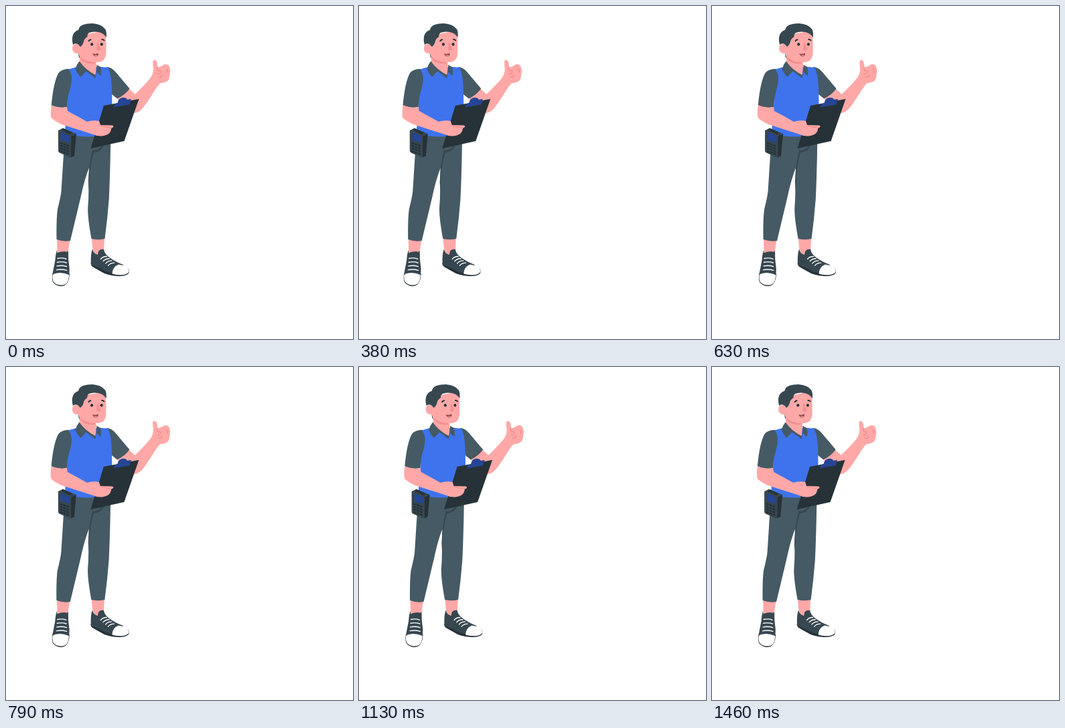
Animation, 518 px wide and 498 px high, one loop 1.5 s. Source, as an HTML page:

```html
<!DOCTYPE html>
<html lang="en">
<head>
<meta charset="utf-8">
<title>Thumbs up</title>
<style>
  html, body { margin: 0; width: 100%; height: 100%; overflow: hidden; background: #fff; }
  svg { display: block; width: 100vw; height: 100vh; }
  .skin { fill: #ffa8a7; }
  .shade { fill: #f28f8f; }
  .blue { fill: #3e73ed; }
  .navy { fill: #264594; }
  .grey { fill: #455a64; }
  .slate { fill: #37474f; }
  .dark { fill: #263238; }
  .white { fill: #fff; }
  .line { fill: none; stroke-linecap: round; stroke-linejoin: round; }
</style>
</head>
<body>
<svg viewBox="0 0 518 498">
  <g id="man">
    <!-- legs -->
    <path class="skin" d="M76 346L96 347Q94 358 92.500 368Q85 372 76.500 368Z"/>
    <path class="skin" d="M127.500 345H147.500Q146 357 146.500 366Q142 372 135 372Q129 367 129 360Z"/>
    <path class="grey" d="M86.500 190Q106 196 131 193L156.200 203Q155.500 250 153.700 289Q151.500 318 147.500 348Q138 350.500 127.500 348Q121.500 315 122.300 301Q124 281 123 264Q124 250 124 242Q117 260 111.500 286L96 351Q86 353 75.500 349Q75 318 77 304Q82 284 82.500 277L86 222Z"/>
    <path class="slate" d="M130 212Q126 228 124 243L123 262Q124 280 123 286L125 248Q127.500 231 131 219Q143 218 146 208L142.500 210Q138 215.500 130 216Z"/>

    <!-- left shoe -->
    <path class="dark" d="M69.500 400Q68 408 70 413Q75 419 83 419Q91 419 94 408L95 400Z"/>
    <path class="slate" d="M76 365Q74 371 73.500 380L69.200 402Q69 409 72 412L92 411Q95 402 94.700 392Q92.500 378 93 366Q91 369 88 367Q82 367 76.500 369Z"/>
    <path class="white" d="M69.500 403Q70 400 76 399.500Q84 398 94 402Q94 409 91 414Q88 417.500 82 417.500Q74 417 70.500 412Q69 408 69.500 403Z"/>
    <g id="lacesL" class="line" stroke="#fff" stroke-width="1.4"></g>

    <!-- right shoe -->
    <path class="dark" d="M126.500 384Q126.500 389 131 391Q138 395 147 400Q158 404 169 404Q179 404 183 400Q185 396 182 392Z"/>
    <path class="slate" d="M129 363.500Q126 371 127 387Q139 391 149 397Q157 400 166 400L175 387Q162 382 153 375Q147 370 146 364Q141 363 138 367L137 372Q131 371 129 363.500Z"/>
    <path class="white" d="M158.500 400.500Q159 390 168 386.500Q172 387 179 389.500Q184 393 183.500 397.500Q181 402 171 402.300Q164 402.500 158.500 400.500Z"/>
    <g id="lacesR" class="line" stroke="#fff" stroke-width="1.4"></g>

    <!-- raised arm -->
    <path class="skin" d="M166 138L183 123L192.500 132Q210 115 216 107Q220 101 220 94Q219 86 219.500 82Q222 78.500 225 83Q227 88 226 92Q233 90 236 87.500Q240 86 243 89Q246 95 245 100Q244 109 242 111.500Q238 115 230 115.500Q225 121 219 131Q209 147 203 154Q197 160 191 160L176 152Z"/>
    <path class="line" stroke="#e8807f" d="M226 91Q225 95 227 97M228 97Q232 95 231 99Q229 102 226 102M231 103Q235 103 233 106Q231 108 228 106M240 94Q242 96 241 99"/>

    <!-- torso -->
    <path class="grey" d="M150 91Q158 92 163 98Q174 111 184.500 123.500Q178 133 166 138.500L158 132Z"/>
    <path class="blue" d="M92 95L106 91L142 91L152 92Q156 99 157.300 112Q158.700 129 158.300 155L135 195Q105 197 88 190Q89 170 91 151Z"/>
    <path class="slate" d="M107.500 69L112 80L109 77Z"/>
    <path class="skin" d="M109.500 66L110 84Q119 98 133.500 105L135 88L134 80Z"/>
    <path class="shade" d="M111 76Q119 84 133 84L133 86Q120 88 112 80Z"/>
    <path class="grey" d="M109.500 82.500Q105 88 103.500 94.500Q107 102 111.500 106L119.500 97.500Q127 103 133.500 108L135 98.500L141.500 104.500Q143.500 97 141 91L135.500 88Q136 96 133.500 103Q119 96 109.500 82.500Z"/>
    <path class="grey" d="M93.500 94Q83 94.500 78.500 100Q71 113 67.700 148.500Q79 154 91 151Q91 139 95.500 124Q99 112 97.700 104Q96 98 93.500 94Z"/>

    <!-- head -->
    <path class="skin" d="M108 44L148 37Q150 45 149.500 72Q148 83 138 84Q126 84 116 78Q110 74 108.500 71Q100 72 99 64Q99 55 108 57Z"/>
    <path class="slate" d="M100 58Q97.500 48 100.500 42Q103.500 37 108 36Q109 30.500 115 28Q121 26 129 26Q143 27 148.500 35Q150.500 39 149.800 47Q145 40 138 39Q130 37.500 124 40Q121 42 121.500 46Q118 48 116.500 51Q115.500 58 111 61Q109.500 59 108 57.500Q103 55 100 58Z"/>
    <path class="shade" d="M136 55L135.500 66Q139 68 142 65Q139 61 137.500 55Z"/>
    <ellipse class="dark" cx="128.200" cy="57.300" rx="2" ry="2.200"/>
    <ellipse class="dark" cx="142.800" cy="57.200" rx="2" ry="2.200"/>
    <path class="line" stroke="#263238" stroke-width="2" d="M123.500 52.300Q124.500 50.500 126.500 50.300M143.300 50Q145.300 49.800 146.500 51.500"/>
    <path fill="#8f4a4c" d="M129 71Q133 72.500 138 70.500Q138 75 134.500 76Q131 75.500 129 71Z"/>
    <path class="shade" d="M131.500 74Q134 72.500 137 74L134.500 76Z"/>

    <!-- clipboard -->
    <path class="dark" d="M146 149L198.500 139L176.500 202L126.500 213Z"/>
    <path class="navy" d="M160.500 151.500L162.500 146.500L166.500 145Q167.500 138 174 137Q180 136.500 181 140L187 139L184.500 147.500Z"/>

    <!-- front arm -->
    <path class="skin" d="M67.700 148Q80 153.500 91 151L92 157Q107 165 121 173Q131 170 139 172L141 178Q150 178 159 178.500Q162 180 159 182Q157 182 157 184Q156 193 143 194.500Q136 195 130 192Q105 184 83 177Q71 171 67.500 167Q66 162 67.700 148Z"/>
    <path class="line" stroke="#e8807f" stroke-width=".8" d="M142 179Q150 182 157 182"/>

    <!-- card terminal -->
    <path class="slate" d="M78.500 186L85 182.500L105 191L97.500 195Z"/>
    <path class="dark" d="M97 195L105 191L102 224L97 226.500Z"/>
    <path class="slate" d="M78 187Q78 185 80 185.500L96 193Q98 194 97.500 197L97 225Q96.500 227 94.500 226L80 219.500Q78 218.500 78 216.500Z"/>
    <path class="dark" d="M83 185.500L86 183.500L99 189.500L96 192Z"/>
    <path class="navy" d="M82 189L95.500 194.500L95 204.500L82 200.500Z"/>
    <g id="keys" class="dark"></g>
  </g>
</svg>
<script>
const $ = id => document.getElementById(id);
const LOOP = 1500, LEAD = 28, UNIT = 1.036;
// sway position at every tenth of the loop
const SWAY = [0, -1, 2, -4, 4, -4, 4, -4, 2, -1, 0];

function sway(ms) {
  const u = ((ms + LEAD) % LOOP) / LOOP * 10;
  const i = Math.floor(u);
  return (SWAY[i] + (SWAY[i + 1] - SWAY[i]) * (u - i)) * UNIT;
}

function addDetails() {
  let left = "", right = "", keys = "";
  for (let i = 0; i < 4; i++) {
    const y = 377.5 + i * 5.7, w = i * 0.5;
    left += `<path d="M${77 - w} ${y}Q84 ${y - 1.5} ${90 + w / 2} ${y + 0.8}"/>`;
    const x = 141.5 + i * 3.7, ry = 378.5 + i * 3.2;
    right += `<path d="M${x} ${ry}Q${x + 3} ${ry - 4} ${x + 9} ${ry - 4}"/>`;
    for (let c = 0; c < 3; c++) {
      const kx = 80.7 + c * 4.8, ky = 203 + i * 4.1 + c * 1.8;
      keys += `<path d="M${kx} ${ky}l3.6 1.4v2.7l-3.6 -1.4z"/>`;
    }
  }
  $("lacesL").innerHTML = left;
  $("lacesR").innerHTML = right;
  $("keys").innerHTML = keys;
}

const man = $("man"), rest = sway(0), start = performance.now();

function draw(ms) {
  man.setAttribute("transform", `translate(${(sway(ms) - rest).toFixed(3)} 0)`);
}

function tick() {
  draw(performance.now() - start);
  requestAnimationFrame(tick);
}

addDetails();
draw(0);
requestAnimationFrame(tick);
</script>
</body>
</html>
```
